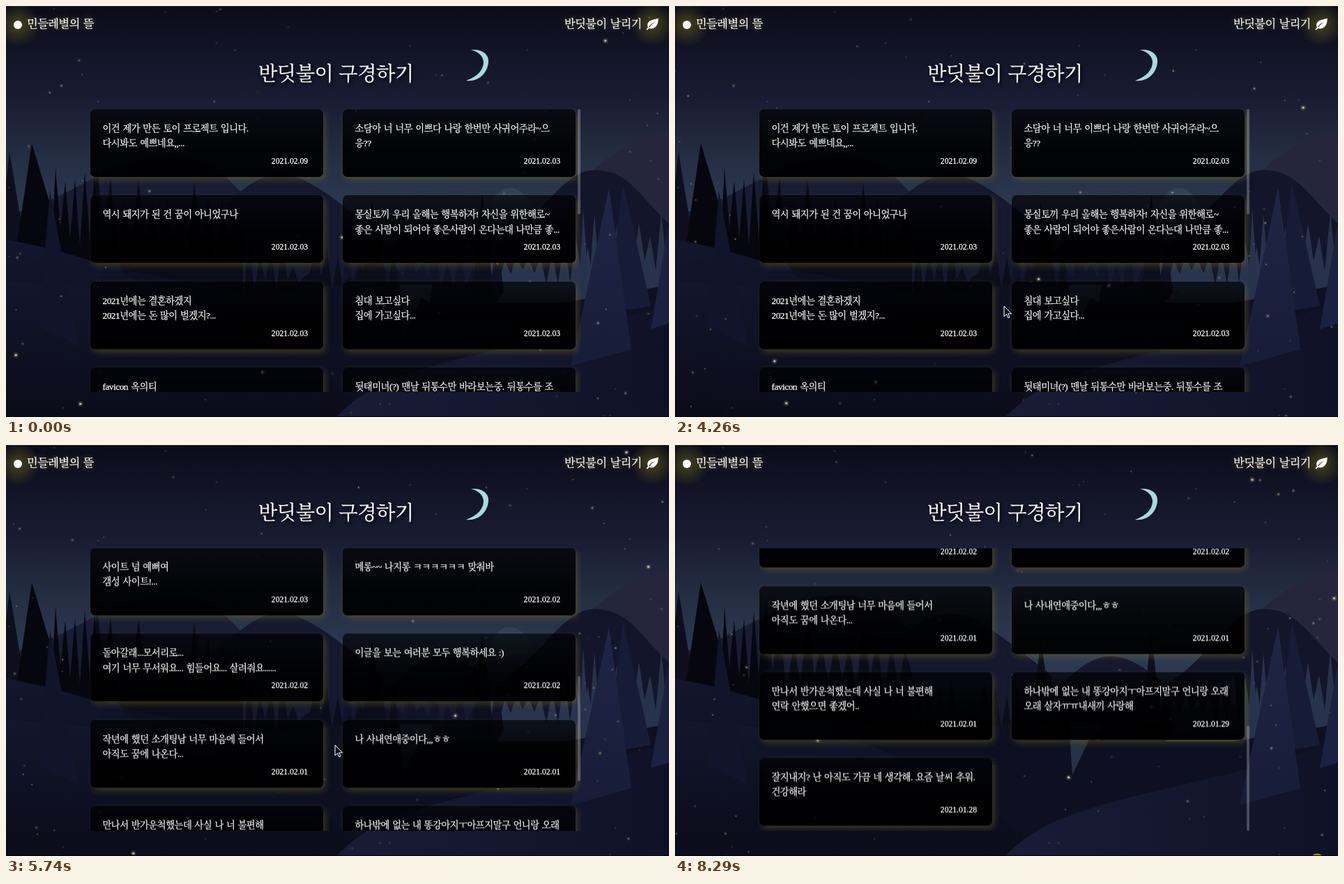
Write an HTML page with a canvas that moves like this. It is 951 px wide and 589 px high and loops after 8.37 s.

```html
<!DOCTYPE html>
<html lang="ko">
<head>
<meta charset="utf-8">
<title>밤의 편지</title>
<style>
html, body { margin: 0; width: 100%; height: 100%; overflow: hidden; background: #0b0c1a; }
#stage {
  position: relative; width: 951px; height: 589px; overflow: hidden; color: #fff;
  font: 13.3px/21.3px "Liberation Serif", "Noto Serif CJK KR", "Noto Sans CJK KR", "Noto Sans CJK", serif;
  letter-spacing: -.036em; word-spacing: .1em; white-space: pre; -webkit-text-stroke: .25px;
}
#stage > * { position: absolute; }
.scene { left: 0; top: 0; width: 951px; height: 589px; }
.nav { top: 16px; font-size: 16.2px; text-shadow: 0 0 9px #6b621c; }
.glow { width: 64px; height: 64px; border-radius: 50%; background: radial-gradient(#81781c80, #6a621438 45%, #0000 70%); }
.dot { left: 11px; top: 21px; width: 12px; height: 12px; border-radius: 50%; background: #fff; }
.leaf { width: 18px; height: 18px; }
h1 { left: 362px; top: 78px; margin: 0; font-size: 28.3px; font-weight: 400; line-height: 40px; text-shadow: 2px 3px 5px #000; }
.card {
  position: absolute; border-radius: 7px; box-sizing: border-box;
  background: linear-gradient(#000000a8, #000000e8 55%, #000000f5);
  box-shadow: 3px 4px 10px #7a701c70;
}
#list { left: 120px; top: 148px; width: 705px; height: 405px; overflow: hidden; }
#list .card { width: 334px; height: 97px; padding: 17px 18px; }
.date { position: absolute; right: 21.5px; top: 64px; font-size: 11.6px; letter-spacing: 0; }
#roll { position: absolute; left: 0; top: 0; will-change: transform; }
#thumb { position: absolute; left: 700px; top: 0; width: 4px; height: 150px; background: #ffffff3d; border-radius: 1px; }
#detail .card { left: 124px; top: 186px; width: 698px; height: 220px; }
#detail .card div { position: absolute; }
.small { font-size: 11.6px; line-height: 17px; }
#button {
  position: absolute; left: 372px; top: 448px; width: 201px; height: 36px; box-sizing: border-box;
  border: 1px solid #eee; border-radius: 18px; padding-left: 18px; font-size: 14.2px; line-height: 34px;
}
.edge { left: 0; top: 0; width: 951px; height: 587px; border: solid #ffffff1c; border-width: 1px 0 0; border-bottom: 1px solid #05060c; }
</style>
</head>
<body>
<div id="stage">
  <svg class="scene" viewBox="0 0 951 589">
    <defs>
      <linearGradient id="sky" x2="0" y2="1">
        <stop stop-color="#0b0c1a"/><stop offset=".22" stop-color="#191b32"/>
        <stop offset=".36" stop-color="#232d42"/><stop offset=".52" stop-color="#2e3b55"/>
        <stop offset=".75" stop-color="#171b33"/><stop offset="1" stop-color="#0b0d1b"/>
      </linearGradient>
      <linearGradient id="ground" x2="0" y2="1">
        <stop stop-color="#13162d"/><stop offset="1" stop-color="#0a0c19"/>
      </linearGradient>
      <linearGradient id="front" x2="1" y2="0">
        <stop stop-color="#181c36"/><stop offset="1" stop-color="#0f1227"/>
      </linearGradient>
      <linearGradient id="pine" x2="0" y2="1">
        <stop stop-color="#1f2645"/><stop offset="1" stop-color="#171c37"/>
      </linearGradient>
    </defs>
    <rect width="951" height="589" fill="url(#sky)"/>
    <path d="M690 300Q700 262 721 261Q745 260 760 300Z" fill="#344259"/>
    <path d="M800 275C850 225 890 190 951 178V360H800Z" fill="#25253d"/>
    <path d="M0 300C90 280 150 215 235 215S320 270 400 320V420H0Z" fill="#191c35"/>
    <path d="M285 310C330 270 360 240 395 241S470 275 540 330V420H285Z" fill="#15182e"/>
    <path d="M500 380C560 350 580 303 625 303S690 345 760 370V420H500Z" fill="#15182e"/>
    <path d="M690 350C760 320 795 234 845 235S910 275 951 312V430H690Z" fill="#13152b"/>
    <g id="woods"></g>
    <path d="M0 335C60 345 110 360 180 385C300 425 420 500 520 580H0Z" fill="url(#ground)"/>
    <path d="M130 370C260 420 420 505 520 589H951V400L800 425H610L520 395L360 415Z" fill="#0e1022"/>
    <path d="M0 393C80 402 170 408 210 410C310 430 420 500 500 560L490 589H0Z" fill="url(#ground)"/>
    <path d="M565 400H612L608 425L596 418L570 473Z" fill="#273149"/>
    <path d="M474 589C510 550 560 530 630 511S840 465 951 425V589Z" fill="url(#front)"/>
    <g id="pines"></g>
    <path d="M667 63C682 61 693 69 692 80C691 96 678 109 660 107C677 101 685 91 685 80C684 71 677 65 667 63Z" fill="#a8dadb"/>
  </svg>
  <canvas id="flies" class="scene" width="951" height="589"></canvas>

  <div class="glow" style="left:-15px;top:-5px"></div>
  <div class="dot"></div>
  <div class="nav" style="left:30px">민들레별의 뜰</div>
  <div class="glow" style="left:895px;top:-6px"></div>
  <div class="nav" style="left:801px">반딧불이 날리기</div>
  <svg class="leaf" style="left:918px;top:17px" viewBox="0 0 18 18"><use href="#leafShape"/></svg>

  <h1>반딧불이 구경하기</h1>
  <div id="list"><div id="roll"></div><div id="thumb"></div></div>

  <div id="detail" class="scene">
    <div class="card">
      <div class="small" style="left:18px;top:17px">To. 나그네</div>
      <div style="left:18px;top:52px">이건 제가 만든 토이 프로젝트 입니다.
다시봐도 예쁘네요,,
꽃 한송이 두고 갑니다,,
--&lt;-&lt;-&lt;@</div>
      <div class="small" style="right:18px;top:171px;text-align:right">2021.02.09
From. 길손님 u((^ o ^ ))u</div>
    </div>
    <div id="button">다른 반딧불이 구경하기</div>
    <div class="glow" style="position:absolute;left:516px;top:434px"></div>
    <svg class="leaf" style="position:absolute;left:540px;top:458px;width:16px;height:16px" viewBox="0 0 18 18">
      <path id="leafShape" d="M17.5 .5C13 3 6 2 3 7C1.5 9.5 2 12 3 13.5L.5 16.5L1.7 17.5L4.5 14.8C10 17 15.5 13 17 7C17.6 4.5 17.8 2 17.5 .5ZM4 13C6 9.5 9 7.5 13 6.3C9.5 8.3 7 10.3 5 13.7Z" fill="#fff" fill-rule="evenodd"/>
    </svg>
  </div>

  <svg id="cursor" style="left:0;top:0;overflow:visible" width="1" height="1">
    <circle id="click" cy="-1" r="10.5" fill="#d8cc00" opacity=".75"/>
    <path id="arrow" d="M0 0V15L3.500 11.700L5.800 17L8 16L5.700 10.900H10.500Z" fill="#11131f" stroke="#fff"/>
    <path id="hand" d="M-1.500 1Q0 -1 1.500 1V6Q3 4.500 4.200 6.300Q6 5 7 7Q9 6 9.300 8.500V13L7.500 18H-1L-4.500 11.500Q-5 8.800 -1.500 11Z" fill="#fff" stroke="#15161d" stroke-width=".7"/>
  </svg>
  <div class="edge"></div>
</div>
<script>
const LOOP = 8370, OPEN = 1950, BACK = 3250;
const ROW = 123.25, VIEW = 405, MAX = 685.5;
const SCROLL_FROM = 4684, SCROLL_TIME = 2064;
const $ = id => document.getElementById(id);
const within = (v, a, b) => v >= a && v < b;
const clamp = v => Math.min(1, Math.max(0, v));

const letters = [
  ["이건 제가 만든 토이 프로젝트 입니다.\n다시봐도 예쁘네요,,...", "02.09"],
  ["소담아 너 너무 이쁘다 나랑 한번만 사귀어주라~으\n응??", "02.03"],
  ["역시 돼지가 된 건 꿈이 아니었구나", "02.03"],
  ["몽실토끼 우리 올해는 행복하자! 자신을 위한해로~\n좋은 사람이 되어야 좋은사람이 온다는대 나만큼 좋...", "02.03"],
  ["2021년에는 결혼하겠지\n2021년에는 돈 많이 벌겠지?...", "02.03"],
  ["침대 보고싶다\n집에 가고싶다...", "02.03"],
  ["favicon 옥의티", "02.03"],
  ["뒷태미녀(?) 맨날 뒤통수만 바라보는중. 뒤통수를 조\n심하시오. 낄낄", "02.03"],
  ["사이트 넘 예뻐여\n갬성 사이트!...", "02.03"],
  ["메롱~~ 나지롱 ㅋㅋㅋㅋㅋㅋ 맞춰바", "02.02"],
  ["돌아갈래...모서리로...\n여기 너무 무서워요... 힘들어요... 살려줘요......", "02.02"],
  ["이글을 보는 여러분 모두 행복하세요 :)", "02.02"],
  ["작년에 했던 소개팅남 너무 마음에 들어서\n아직도 꿈에 나온다...", "02.01"],
  ["나 사내연애중이다,,,ㅎㅎ", "02.01"],
  ["만나서 반가운척했는데 사실 나 너 불편해\n연락 안했으면 좋겠어..", "02.01"],
  ["하나밖에 없는 내 똥강아지ㅜ아프지말구 언니랑 오래\n오래 살자ㅠㅠ내새끼 사랑해", "01.29"],
  ["잘지내지? 난 아직도 가끔 네 생각해. 요즘 날씨 추워.\n건강해라", "01.28"]
];
letters.forEach(([text, day], i) => {
  const card = document.createElement("div");
  card.className = "card";
  card.style.left = (i % 2 ? 362.5 : .5) + "px";
  card.style.top = Math.floor(i / 2) * ROW + "px";
  card.textContent = text;
  const date = document.createElement("div");
  date.className = "date";
  date.textContent = "2021." + day;
  card.append(date);
  $("roll").append(card);
});

function seeded(seed) {
  return () => (seed = seed * 16807 % 2147483647) / 2147483647;
}

// A row of pointed firs: tops vary by `rough`, valleys lie near the base
function firs(from, to, step, top, base, rough, fill, seed) {
  const rnd = seeded(seed);
  let d = `M${from} ${base}`;
  for (let x = from; x < to; x += step) {
    d += `L${x + step / 2} ${top + rnd() * rough}L${x + step} ${base - (base - top) * (.2 + rnd() * .3)}`;
  }
  return `<path d="${d}L${to} ${base}Z" fill="${fill}"/>`;
}
const spike = (x, y, x1, y1, x2, y2, fill) =>
  `<path d="M${x} ${y}L${x1} ${y1}L${x2} ${y2}Z" fill="${fill}"/>`;

$("woods").innerHTML =
  firs(690, 830, 17, 325, 430, 40, "#29354e", 41) +
  firs(820, 951, 16, 290, 440, 40, "#27324b", 77) +
  firs(480, 700, 18, 330, 430, 50, "#101226", 19) +
  firs(120, 340, 20, 225, 410, 75, "#0a0c18", 7) +
  firs(340, 560, 16, 330, 432, 70, "#0b0d1a", 23) +
  spike(683, 270, 668, 415, 700, 415, "#0d0f1f") +
  spike(525, 280, 508, 415, 544, 415, "#0b0d1a") +
  spike(5, 209, -12, 360, 30, 360, "#0d0f1f") +
  firs(64, 122, 14, 232, 375, 25, "#06070e", 5) +
  spike(37, 197, 14, 352, 88, 365, "#06070e");

$("pines").innerHTML =
  spike(150, 350, 115, 438, 205, 443, "#101328") +
  spike(63, 265, 47, 460, 105, 487, "#11142a") +
  spike(885, 254, 862, 440, 925, 430, "#171c36") +
  spike(951, 310, 925, 463, 951, 455, "#1b2140") +
  spike(865, 261, 810, 516, 897, 492, "url(#pine)");

// Drifting fireflies; the first few are larger and brighter
const rnd = seeded(2021);
const swarm = Array.from({ length: 85 }, (_, i) => ({
  x: rnd() * 971, y: rnd() * 609, vx: (rnd() - .5) * 44, vy: (rnd() - .5) * 44,
  bend: rnd() * 14, phase: rnd() * 6.3,
  r: i < 9 ? 1.8 : .6 + rnd() * .9, glow: i < 9 ? .75 : .12 + rnd() * .3
}));
const still = Array.from({ length: 25 }, () => [rnd() * 951, rnd() * 589]);

const ctx = $("flies").getContext("2d");
function spot(x, y, r, alpha) {
  for (const [size, k] of [[2.2, .2], [1, 1]]) {
    ctx.globalAlpha = alpha * k;
    ctx.beginPath();
    ctx.arc(x, y, r * size, 0, 7);
    ctx.fill();
  }
}
function drawFlies(t) {
  const s = t / 1000, wrap = (v, n) => ((v + 10) % n + n) % n - 10;
  ctx.clearRect(0, 0, 951, 589);
  ctx.fillStyle = "#e5d9ae";
  still.forEach(([x, y]) => spot(x, y, 1, .15));
  swarm.forEach(f => {
    const turn = s * .8 + f.phase;
    spot(wrap(f.x + f.vx * s + f.bend * Math.sin(turn), 971),
      wrap(f.y + f.vy * s + f.bend * Math.cos(turn), 609), f.r, f.glow);
  });
}

// Pointer trips: start, length, and where each one ends
const entry = { x: 962, y: 300 };
const trips = [
  { at: 950, ms: 700, x: 300, y: 205 },
  { at: 2000, ms: 950, x: 512, y: 467 },
  { at: 3350, ms: 500, x: 472, y: 430 },
  { at: 7150, ms: 1000, x: 921, y: 597 }
];
function pointerAt(t) {
  let { x, y } = entry;
  for (const trip of trips) {
    const k = (1 - Math.cos(Math.PI * clamp((t - trip.at) / trip.ms))) / 2;
    x += (trip.x - x) * k;
    y += (trip.y - y) * k;
  }
  return { x, y };
}

const show = (el, on) => { el.style.visibility = on ? "visible" : "hidden"; };
const title = document.querySelector("h1");

function draw(t) {
  const reading = within(t, OPEN, BACK);
  show($("list"), !reading);
  show(title, !reading);
  show($("detail"), reading);

  const top = MAX * Math.sin(Math.PI / 2 * clamp((t - SCROLL_FROM) / SCROLL_TIME));
  $("roll").style.transform = `translateY(${-top}px)`;
  $("thumb").style.transform = `translateY(${top * VIEW / (VIEW + MAX)}px)`;

  const { x, y } = pointerAt(t);
  const overCard = within(y, 148, 553) && (within(x, 120, 454) || within(x, 482, 816));
  const overButton = within(x, 372, 573) && within(y, 448, 484);
  const hand = reading ? overButton : overCard;
  const seen = t > entry.x - 12;
  $("cursor").style.transform = `translate(${x}px, ${y}px)`;
  show($("arrow"), seen && !hand);
  show($("hand"), seen && hand);
  show($("click"), within(t, 1800, 1980) || within(t, 3020, 3220) || t > 8200);
  drawFlies(t);
}

const start = performance.now();
function tick() {
  draw((performance.now() - start) % LOOP);
  requestAnimationFrame(tick);
}
tick();
</script>
</body>
</html>
```
